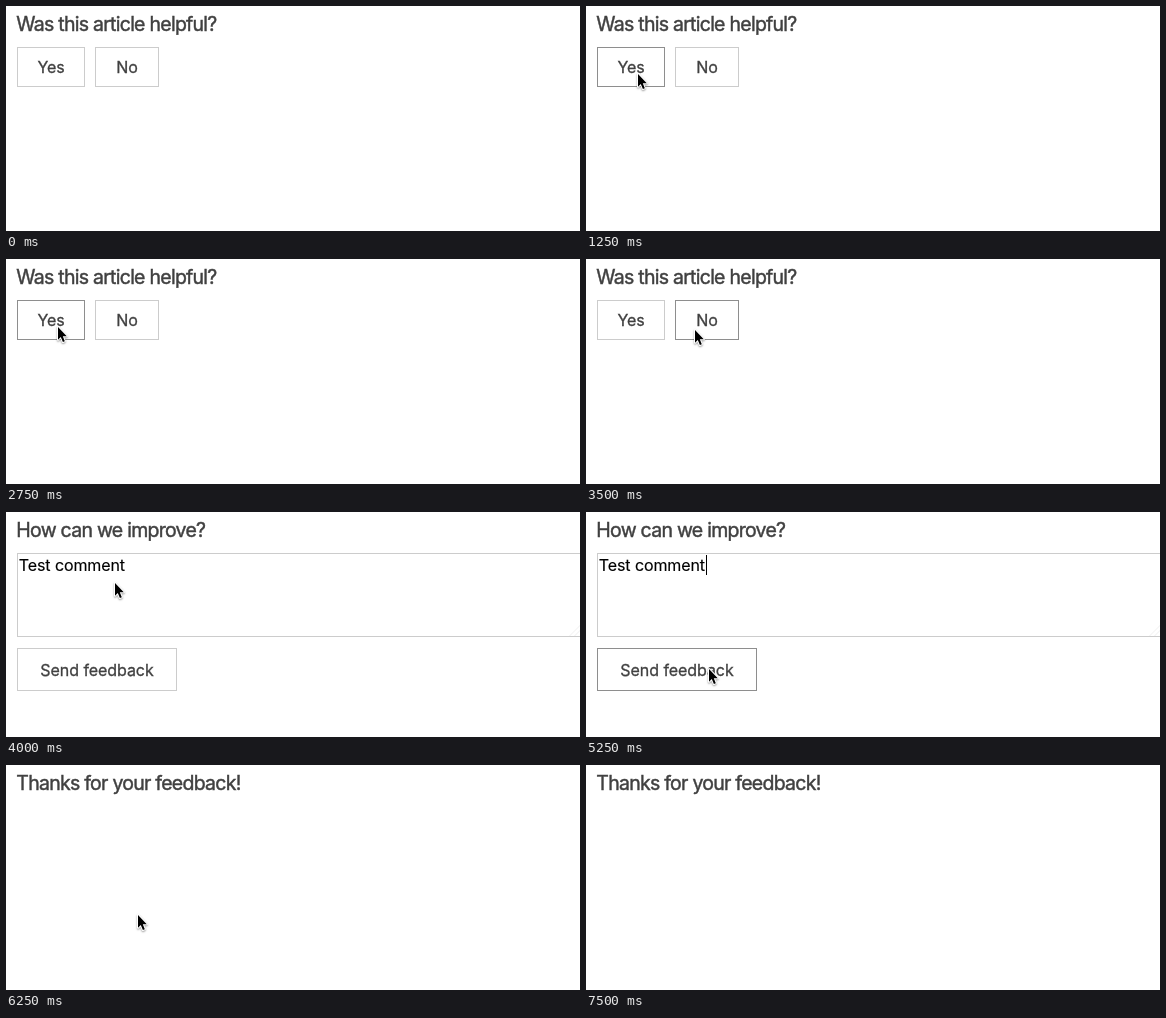
Recreate the animation shown at these times as an HTML page with a canvas. Size 574 by 225 pixels, loop 7750 ms.

```html
<!DOCTYPE html>
<html lang="en">
<head>
<meta charset="utf-8">
<title>Article feedback</title>
<style>
html, body { margin: 0; width: 100%; height: 100%; overflow: hidden; background: #fff; }
canvas { display: block; width: 574px; height: 225px; }
</style>
</head>
<body>
<canvas id="stage"></canvas>
<script>
const W = 574, H = 225, LOOP = 7750, TICK = 250;
const INK = '#404040';
const canvas = document.getElementById('stage');
const ctx = canvas.getContext('2d');
const ratio = window.devicePixelRatio || 1;
canvas.width = W * ratio;
canvas.height = H * ratio;

// Where the pointer tip rests and from when, in ms
const stops = [
  { t: 750, x: 325, y: 15 },
  { t: 1000, x: 52, y: 68 },
  { t: 3000, x: 40, y: 57 },
  { t: 3250, x: 108, y: 74 },
  { t: 3500, x: 109, y: 71 },
  { t: 4250, x: 112, y: 74 },
  { t: 4750, x: 119, y: 64 },
  { t: 5000, x: 138, y: 120 },
  { t: 5250, x: 123, y: 157 },
  { t: 6250, x: 132, y: 150 },
  { t: 6500, x: 138, y: 140 },
  { t: 6750, x: 281, y: -6 }
];
const LEAVE = 7000;

function pointerAt(t) {
  return t < LEAVE ? stops.findLast(stop => stop.t <= t) : undefined;
}

function sceneAt(t) {
  if (t >= 5500) return drawThanks;
  if (t >= 4000) return drawForm;
  return t >= 1750 && t < 2750 ? drawThanks : drawAsk;
}

function text(str, x, y, size, spacing, color, weight = 0) {
  ctx.font = `${size}px Inter, Roboto, sans-serif`;
  ctx.letterSpacing = spacing + 'px';
  ctx.fillStyle = ctx.strokeStyle = color;
  ctx.fillText(str, x, y);
  if (weight) {
    ctx.lineWidth = weight;
    ctx.strokeText(str, x, y);
  }
}

function title(str) {
  text(str, 10.3, 25, 19.5, -0.74, INK, 0.45);
}

function box(x, y, w, h, color) {
  ctx.strokeStyle = color;
  ctx.lineWidth = 1;
  ctx.strokeRect(x + 0.5, y + 0.5, w - 1, h - 1);
}

function button(label, x, y, w, h, tip) {
  const hover = tip && tip.x > x && tip.x < x + w && tip.y > y && tip.y < y + h;
  box(x, y, w, h, hover ? '#8e8e8e' : '#ccc');
  ctx.textAlign = 'center';
  text(label, x + w / 2, y + h / 2 + 6, 16, -0.06, INK, 0.3);
  ctx.textAlign = 'left';
}

function drawThanks() {
  title('Thanks for your feedback!');
}

function drawAsk(t, tip) {
  title('Was this article helpful?');
  button('Yes', 11, 41, 68, 40, tip);
  button('No', 89, 41, 64, 40, tip);
}

function drawForm(t, tip) {
  title('How can we improve?');
  box(11, 41, 566, 84, '#ccc');
  text('Test comment', 12.8, 59, 16, -0.1, '#000', 0.15);
  drawGrip();
  if (t >= 5000) {
    ctx.fillStyle = '#000';
    ctx.fillRect(120, 43, 1, 20);
  }
  button('Send feedback', 11, 136, 160, 43, tip);
}

function drawGrip() {
  ctx.strokeStyle = '#888';
  for (const size of [11, 6]) {
    ctx.beginPath();
    ctx.moveTo(574.5 - size, 124);
    ctx.lineTo(574.5, 124 - size);
    ctx.stroke();
  }
}

function drawPointer({ x, y }) {
  const arrow = new Path2D('M0 0V12.8L2.8 10.1L4.9 15L6.8 14.2L4.8 9.3H8.8Z');
  ctx.save();
  ctx.translate(x, y);
  ctx.lineJoin = 'round';
  ctx.lineWidth = 2;
  ctx.strokeStyle = '#fff';
  ctx.shadowColor = 'rgba(0,0,0,0.4)';
  ctx.shadowBlur = 2 * ratio;
  ctx.shadowOffsetY = ratio;
  ctx.stroke(arrow);
  ctx.shadowColor = 'transparent';
  ctx.fillStyle = '#000';
  ctx.fill(arrow);
  ctx.restore();
}

function draw(now) {
  const t = Math.floor((now % LOOP) / TICK) * TICK;
  const tip = pointerAt(t);
  ctx.setTransform(ratio, 0, 0, ratio, 0, 0);
  ctx.fillStyle = '#fff';
  ctx.fillRect(0, 0, W, H);
  sceneAt(t)(t, tip);
  if (tip) drawPointer(tip);
}

const begin = performance.now();
function tick() {
  draw(performance.now() - begin);
  requestAnimationFrame(tick);
}
tick();
</script>
</body>
</html>
```
